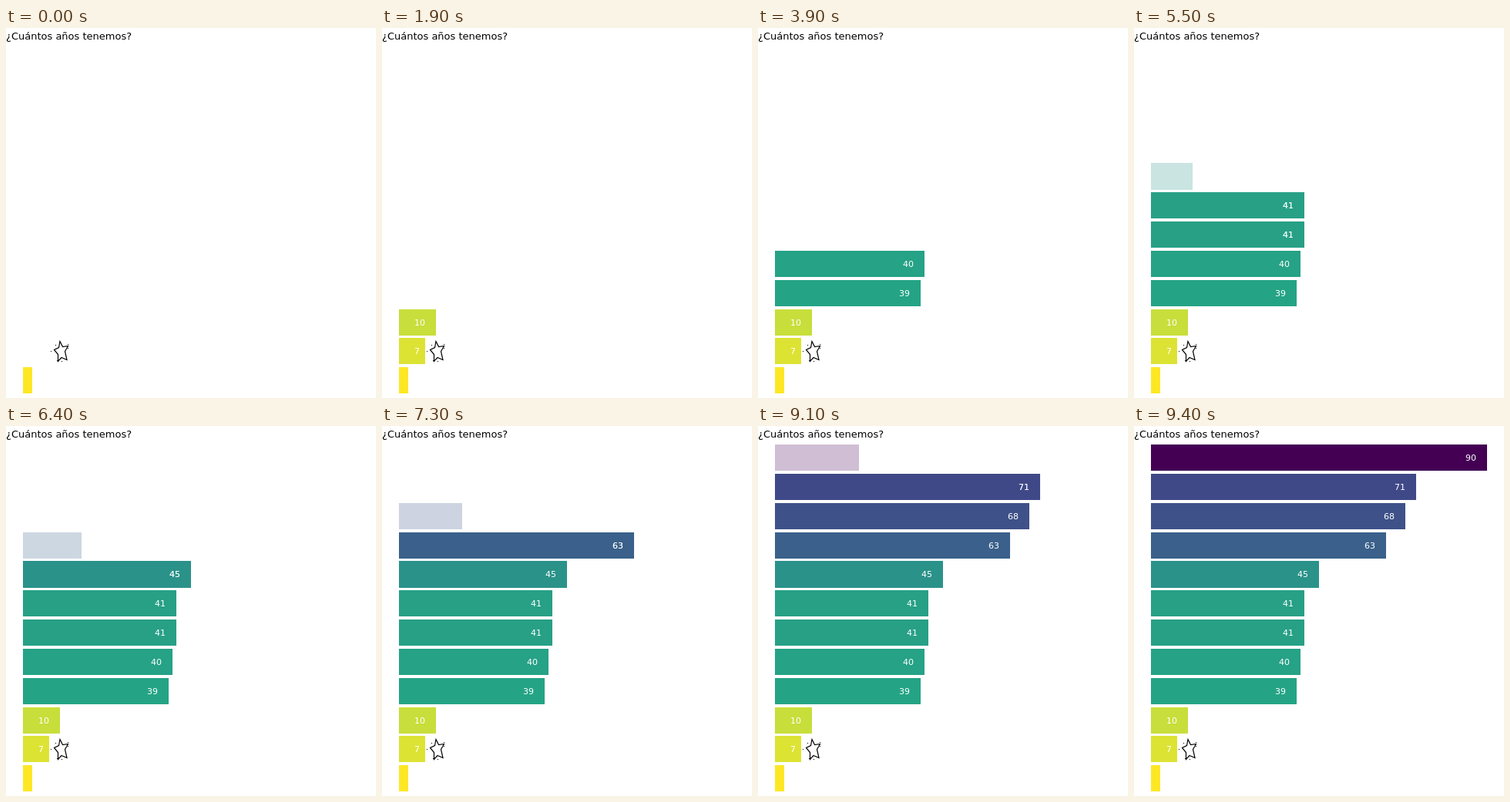
An HTML page for the animation above (10000 ms loop, 480 by 480 pixels).

```html
<!DOCTYPE html>
<html lang="es">
<head>
<meta charset="utf-8">
<title>¿Cuántos años tenemos?</title>
<style>
  html, body { margin: 0; width: 100%; height: 100%; overflow: hidden; background: #fff; }
  svg { display: block; width: 100%; height: 100%; }
  text { font-family: "DejaVu Sans", sans-serif; }
</style>
</head>
<body>
<svg id="stage" viewBox="0 0 480 480">
  <rect width="480" height="480" fill="#fff"/>
  <text x="0" y="15" font-size="13">¿Cuántos años tenemos?</text>
  <g id="bars"></g>
  <g id="labels" font-size="11" fill="#fff" text-anchor="end"></g>
  <path d="M70 406.5L73.5 413.5L80.5 412.5L76.5 419.5L79 430.5L72 427.5L67.5 432.5L67.5 423.5L62.5 417.5L68.5 414.5Z"
        fill="#fff" stroke="#000" stroke-width="1.2"/>
  <path d="M58 419h1v1h-1zM64 411h1v1h-1zM80 410h1v1h-1zM80 415h1v1h-1zM72 432h1v1h-1zM66 431h1v1h-1z"/>
</svg>
<script>
const LOOP = 10000, STEP = 100;
const LEFT = 22, ORIGIN = 21.8, UNIT = 4.85;
const BASE = 440.25, PITCH = 37.83, HEIGHT = 34.07;

// age, colour, start of entry (ms), number of entry steps
const people = [
  [2.5, "#fde725", -1000, 5],
  [7, "#dde333", 500, 5],
  [10, "#c8de3b", 1500, 5],
  [39, "#24a485", 2500, 5],
  [40, "#26a286", 3500, 5],
  [41, "#27a086", 4500, 5],
  [41, "#27a086", 4500, 5],
  [45, "#2a9289", 5500, 4],
  [63, "#3a608b", 6400, 4],
  [68, "#3f5189", 7300, 4],
  [71, "#404988", 8200, 4],
  [90, "#440154", 9100, 4]
];

function add(parent, tag, attrs) {
  const el = document.createElementNS("http://www.w3.org/2000/svg", tag);
  for (const key in attrs) el.setAttribute(key, attrs[key]);
  return document.getElementById(parent).appendChild(el);
}

const rows = people.map(([age, fill, start, steps], i) => {
  const exact = BASE - i * PITCH;
  const y = Math.round(exact);
  const height = Math.round(exact + HEIGHT) - y;
  const bar = add("bars", "rect", { x: LEFT, y, height, fill });
  const texts = [];
  if (Number.isInteger(age)) {
    const x = Math.round(ORIGIN + age * UNIT) - 7 * String(age).length;
    for (let n = 0; n < 2; n++) {
      const text = add("labels", "text", { x, y: y + 21 });
      text.textContent = age;
      texts.push(text);
    }
  }
  const next = people.find(p => p[2] > start);
  return { age, start, steps, bar, texts, next };
});

function progress(t, start, steps) {
  const n = Math.floor((t - start) / STEP) + 1;
  return Math.max(0, Math.min(1, n / steps));
}

function render(t) {
  for (const { age, start, steps, bar, texts, next } of rows) {
    const p = progress(t, start, steps);
    const end = Math.round(ORIGIN + age * UNIT * p);
    bar.setAttribute("width", Math.max(0, end - LEFT));
    bar.setAttribute("opacity", p);
    if (!texts.length) continue;
    texts[0].setAttribute("opacity", p);
    // a second copy of the label fades out while the next bar enters
    const q = next ? progress(t, next[2], next[3]) : 0;
    texts[1].setAttribute("opacity", q > 0 ? 1 - q : 0);
  }
}

const begin = performance.now();
function tick() {
  render((performance.now() - begin) % LOOP);
  requestAnimationFrame(tick);
}
tick();
</script>
</body>
</html>
```
